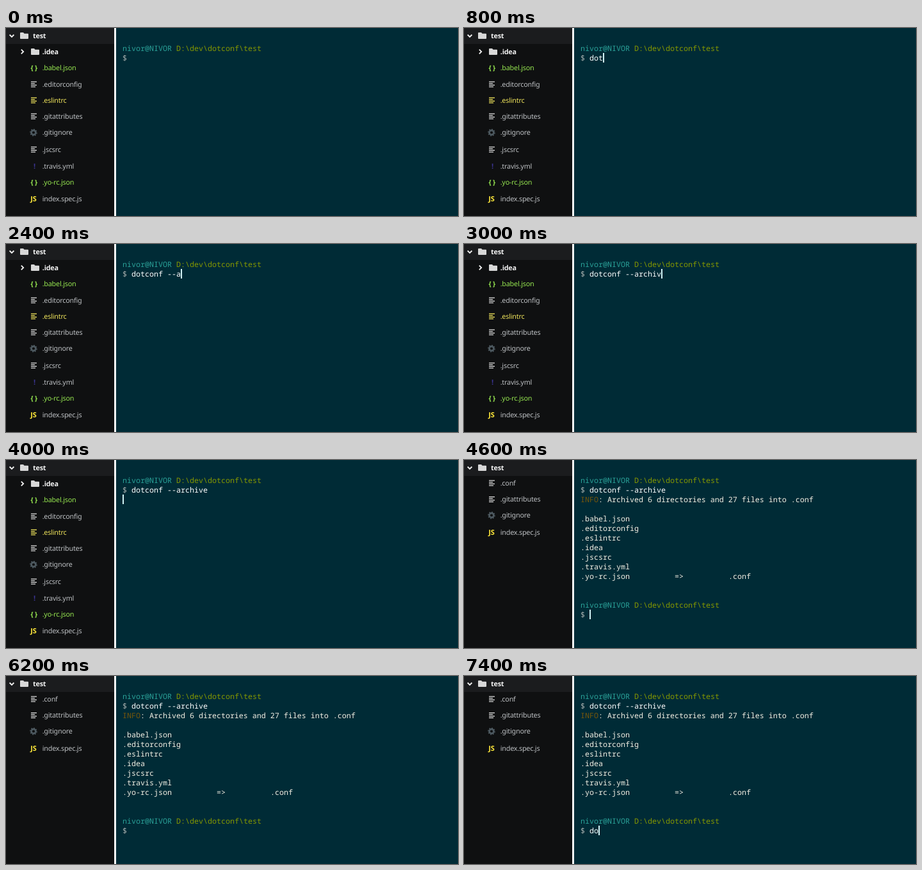
An HTML page for the animation above (8000 ms loop, 706 px wide and 294 px high).

```html
<!DOCTYPE html>
<html lang="en">
<head>
<meta charset="utf-8">
<title>dotconf --archive</title>
<style>
  html, body { margin: 0; width: 100%; height: 100%; overflow: hidden; background: #002b36; }
  svg { display: block; }
  text { white-space: pre; text-rendering: geometricPrecision; }
  .term { font: 11.667px "Noto Sans Mono", monospace; }
  .tree { font: 10.8px "Noto Sans", sans-serif; letter-spacing: -.22px; }
  .bold { font-weight: 700; }
</style>
</head>
<body>
<svg id="stage" width="706" height="294" viewBox="0 0 706 294"></svg>
<script>
const LOOP = 8000, CELL = 7, LINE = 15, LEFT = 182, TOP = 24;
const C = {
  gray: '#bcbfc2', white: '#f2f2f2', green: '#96e650', yellow: '#f0e45c', slate: '#4d5960',
  indigo: '#3b3591', teal: '#2aa198', olive: '#859900', prompt: '#a8b0ae', out: '#f4f0e4',
  info: '#75570c', typed: '#ffffff'
};
const stage = document.getElementById('stage');

function add(parent, tag, attrs, text) {
  const el = document.createElementNS('http://www.w3.org/2000/svg', tag);
  for (const k in attrs) el.setAttribute(k, attrs[k]);
  if (text) el.textContent = text;
  return parent.appendChild(el);
}
const group = () => add(stage, 'g', {});
const rect = (g, x, y, width, height, fill) => add(g, 'rect', { x, y, width, height, fill });

// Terminal text on a grid of character cells
const term = (g, row, col, fill, text) => add(g, 'text', {
  class: 'term', x: LEFT + col * CELL, y: TOP + row * LINE + 12, fill
}, text);

function promptLines(g, row) {
  term(g, row, 0, C.teal, 'nivor@NIVOR');
  term(g, row, 12, C.olive, 'D:\\dev\\dotconf\\test');
  term(g, row + 1, 0, C.prompt, '$');
}

// Sidebar icons, each centred on y
const chevron = (g, d) => add(g, 'path', {
  d, fill: 'none', stroke: C.white, 'stroke-width': 1.8
});
const folder = (g, x, y) => add(g, 'path', {
  d: `M${x} ${y - 4}q0-1 1-1h4l1.6 1.7h5.4q1 0 1 1v6.3q0 1-1 1h-11q-1 0-1-1z`, fill: '#d8d8d8'
});
const glyph = (g, x, y, size, fill, text) => add(g, 'text', {
  class: 'tree bold', x, y, fill, style: `font-size:${size}px`, 'text-anchor': 'middle'
}, text);

const icons = {
  braces: (g, y) => glyph(g, 43.7, y + 3.5, 10.5, C.green, '{ }'),
  lines: (g, y, fill = '#d8d8d8') =>
    [9, 6, 9, 7].forEach((w, i) => rect(g, 39, y - 4.5 + i * 2.6, w, 1.3, fill)),
  yellowLines: (g, y) => icons.lines(g, y, C.yellow),
  gear(g, y) {
    add(g, 'circle', { cx: 43, cy: y, r: 3.4, fill: 'none', stroke: C.slate, 'stroke-width': 2.6 });
    add(g, 'circle', {
      cx: 43, cy: y, r: 5, fill: 'none', stroke: C.slate, 'stroke-width': 1.6,
      pathLength: 16, 'stroke-dasharray': '1 1'
    });
  },
  bang: (g, y) => glyph(g, 44.5, y + 4, 11, C.indigo, '!'),
  js: (g, y) => glyph(g, 43, y + 4.3, 11, '#ffe83a', 'JS')
};

function file(g, y, icon, name, fill = C.gray) {
  icons[icon](g, y);
  add(g, 'text', { class: 'tree', x: 56.7, y: y + 3.8, fill }, name);
}

// Sidebar frame
rect(stage, 0, 0, 706, 294, '#002b36');
rect(stage, 0, 0, 169, 294, '#0f1011');
rect(stage, 0, 0, 169, 25, '#1b1c1e');
rect(stage, 169, 0, 3, 294, '#fafcfc');
chevron(stage, 'M5.6 10.5l3.4 3.4l3.4-3.4');
folder(stage, 22, 12);
add(stage, 'text', { class: 'tree bold', x: 42, y: 16, fill: C.white }, 'test');

const before = group();
chevron(before, 'M23.8 33.6l3.4 3.4l-3.4 3.4');
folder(before, 39, 37);
add(before, 'text', { class: 'tree bold', x: 56.8, y: 41, fill: C.white }, '.idea');
file(before, 62, 'braces', '.babel.json', C.green);
file(before, 88, 'lines', '.editorconfig');
file(before, 113, 'yellowLines', '.eslintrc', C.yellow);
file(before, 138, 'lines', '.gitattributes');
file(before, 163.5, 'gear', '.gitignore');
file(before, 190, 'lines', '.jscsrc');
file(before, 216, 'bang', '.travis.yml');
file(before, 241, 'braces', '.yo-rc.json', C.green);
file(before, 267, 'js', 'index.spec.js');

const after = group();
file(after, 36, 'lines', '.conf');
file(after, 61.5, 'lines', '.gitattributes');
file(after, 86.5, 'gear', '.gitignore');
file(after, 113, 'js', 'index.spec.js');

// Terminal
promptLines(stage, 0);
term(after, 2, 0, C.info, 'INFO');
term(after, 2, 4, C.out, ': Archived 6 directories and 27 files into .conf');
['.babel.json', '.editorconfig', '.eslintrc', '.idea', '.jscsrc', '.travis.yml', '.yo-rc.json']
  .forEach((name, i) => term(after, 4 + i, 0, C.out, name));
term(after, 10, 21, C.out, '=>');
term(after, 10, 33, C.out, '.conf');
promptLines(after, 13);

const COMMAND = 'dotconf --archive';
const first = term(stage, 1, 2, C.typed, '');
const second = term(after, 14, 2, C.typed, '');
const cursor = rect(stage, 0, 0, 2, LINE, '#d2f2f5');

// [time, letters typed, cursor row (-1 = hidden)]
const steps = [
  [0, 0, -1], [200, 0, 1], [400, 1, 1], [600, 2, 1], [800, 3, 1], [1000, 4, 1], [1200, 5, 1],
  [1400, 7, 1], [2000, 8, 1], [2200, 10, 1], [2400, 11, 1], [2600, 12, 1], [2800, 13, 1],
  [3000, 16, 1], [3200, 17, 1], [3800, 17, -1], [4000, 17, 2],
  [4600, 0, 14], [5200, 0, -1], [5800, 0, 14], [6200, 0, -1], [6800, 0, 14], [7400, 2, 14]
];
const DONE = 4600;

function draw(t) {
  const [start, typed, row] = steps.findLast(s => s[0] <= t);
  const done = start >= DONE;
  before.style.display = done ? 'none' : '';
  after.style.display = done ? '' : 'none';
  first.textContent = done ? COMMAND : COMMAND.slice(0, typed);
  second.textContent = done ? COMMAND.slice(0, typed) : '';
  cursor.style.display = row < 0 ? 'none' : '';
  cursor.setAttribute('x', LEFT + (row === 2 ? 0 : 2 + typed) * CELL);
  cursor.setAttribute('y', TOP + row * LINE);
}

const origin = performance.now();
function tick() {
  draw((performance.now() - origin) % LOOP);
  requestAnimationFrame(tick);
}
tick();
</script>
</body>
</html>
```
